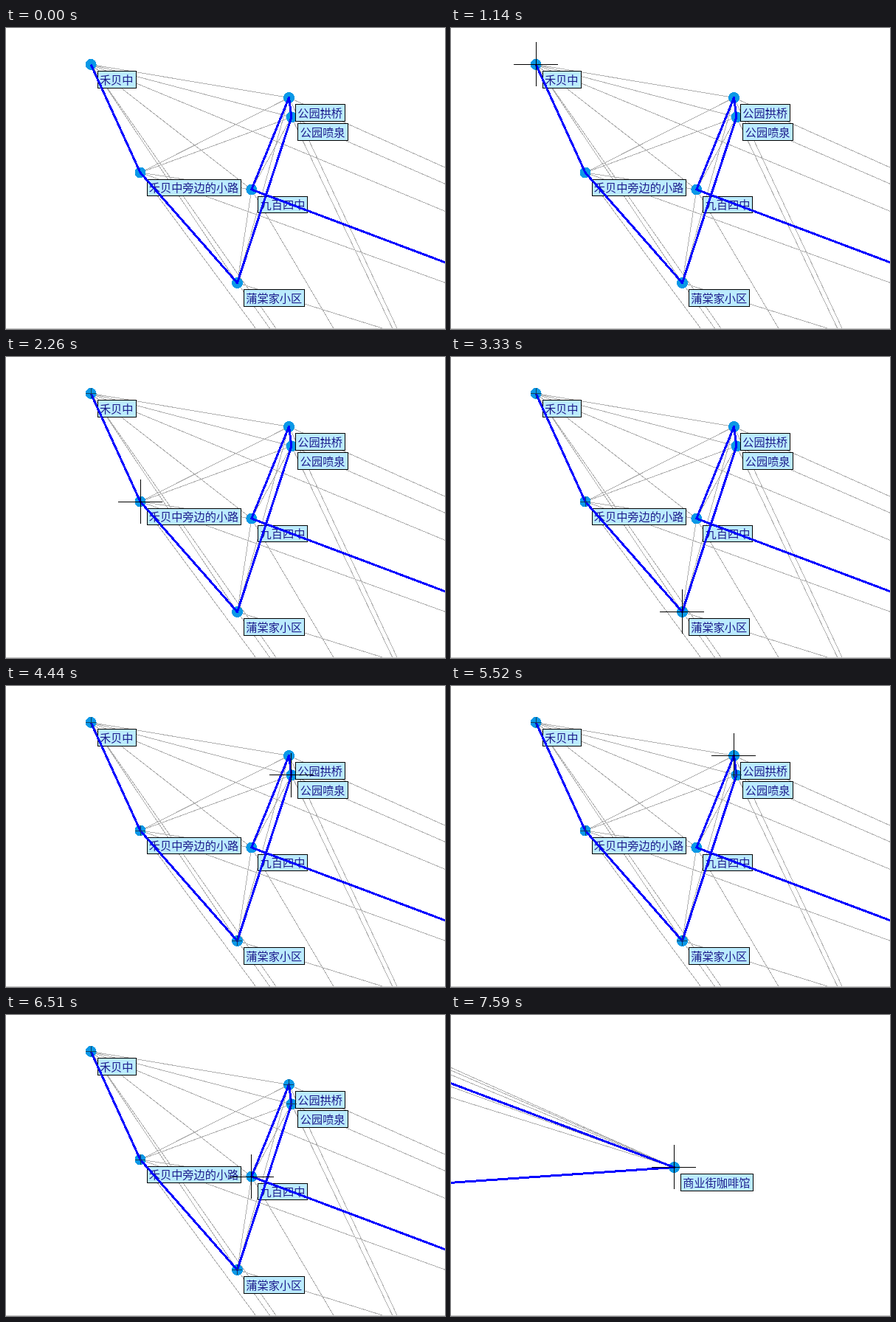
These frames come from a looping animation (595x408 px, 8 s). An HTML page:

```html
<!DOCTYPE html>
<html lang="zh-CN">
<head>
<meta charset="utf-8">
<title>路线</title>
<style>
  html, body { margin: 0; width: 100%; height: 100%; overflow: hidden; background: #fff; }
  svg { display: block; width: 100vw; height: 100vh; shape-rendering: crispEdges; }
  .link { stroke: #b0b0b0; stroke-width: 1; }
  .route { fill: none; stroke: #00f; stroke-width: 3; stroke-linejoin: round; }
  .dot { fill: #0a98e6; }
  .box { fill: #bbebfd; stroke: #000; stroke-width: 1; }
  .cross { fill: #000; }
  .mark { fill: #10405f; }
  text { font: 300 15.2px "Noto Sans CJK SC", "Noto Sans CJK", sans-serif; fill: #1c1c8c; }
</style>
</head>
<body>
<svg viewBox="0 0 595 408" preserveAspectRatio="none">
  <g id="map"></g>
  <rect y="407" width="595" height="1" fill="#c4c4c4"/>
</svg>
<script>
const LOOP = 8000;
const stops = [
  [115.1, 49.5, '禾贝中'],
  [182, 196, '禾贝中旁边的小路'],
  [313.5, 345.5, '蒲棠家小区'],
  [386.95, 120.8, '公园喷泉'],
  [383.5, 94.5, '公园拱桥'],
  [332.8, 219, '九百四中'],
  [2422.5, 1005.5, '商业街咖啡馆'],
  [861, 1113, '']
];
const visits = [1140, 2260, 3330, 4440, 5520, 6510, 7590];
const map = document.getElementById('map');
const { floor } = Math;

function add(tag, attrs, parent = map) {
  const el = document.createElementNS('http://www.w3.org/2000/svg', tag);
  for (const key in attrs) el.setAttribute(key, attrs[key]);
  return parent.appendChild(el);
}

function addCross(cls, cx, cy, size) {
  const g = add('g', { class: cls });
  const reach = size / 2 - .4;
  add('rect', { x: floor(cx - reach), y: floor(cy), width: size, height: 1 }, g);
  add('rect', { x: floor(cx), y: floor(cy - reach), width: 1, height: size }, g);
  return g;
}

function addLabel(px, py, name) {
  const left = px + 9, top = py + 9;
  const x = floor(left), y = floor(top);
  add('rect', {
    class: 'box', x: x + .5, y: y + .5,
    width: floor(left + name.length * 15.2 + 6.3) - x,
    height: floor(top + 22.7) - y
  });
  add('text', { x: left + 2.8, y: top + 17 }).textContent = name;
}

stops.forEach(([x1, y1], i) => {
  for (const [x2, y2] of stops.slice(i + 1)) add('line', { class: 'link', x1, y1, x2, y2 });
});
for (const [cx, cy] of stops) add('circle', { class: 'dot', cx, cy, r: 7.5 });
for (const stop of stops) if (stop[2]) addLabel(...stop);
add('polyline', { class: 'route', points: stops.map(([x, y]) => x + ',' + y).join(' ') });

// Visited dots keep a small trace of the cross.
const marks = visits.map((_, i) => addCross('mark', stops[i][0], stops[i][1], 14));
const crosses = visits.map((_, i) => addCross('cross', stops[i][0], stops[i][1], 60));

function show(el, on) {
  el.setAttribute('visibility', on ? 'visible' : 'hidden');
}

function draw(t) {
  const at = visits.filter(v => v <= t).length - 1;
  marks.forEach((el, i) => show(el, i < at));
  crosses.forEach((el, i) => show(el, i === at));
  // The view jumps to the far stop at the end.
  map.setAttribute('transform', at === 6 ? 'translate(-2120 -799)' : 'translate(0 0)');
}

const start = performance.now();
function tick() {
  draw((performance.now() - start) % LOOP);
  requestAnimationFrame(tick);
}
tick();
</script>
</body>
</html>
```
